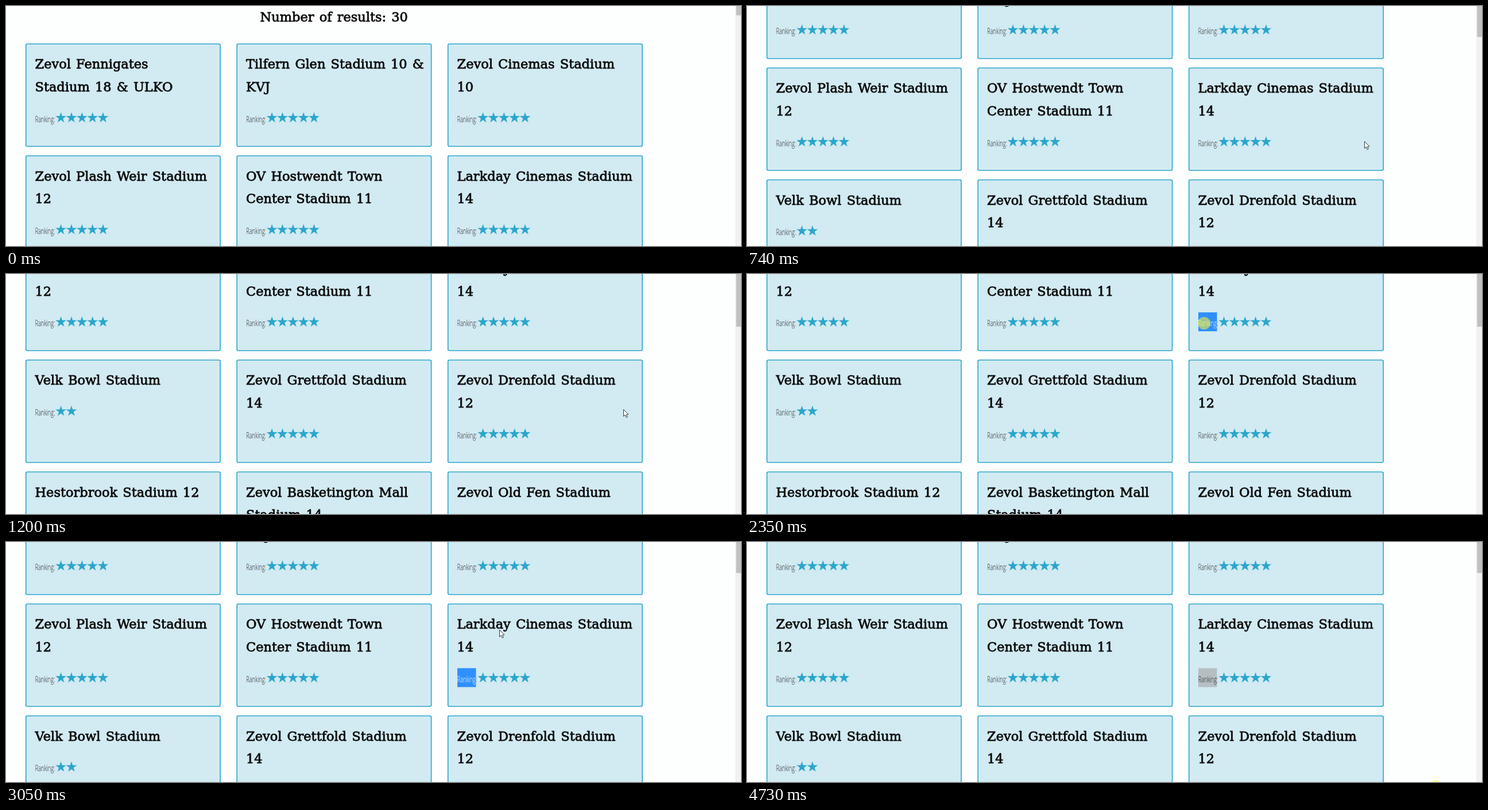
These frames come from a looping animation (1280x419 px, 4800 ms). An HTML page with a canvas:

```html
<!DOCTYPE html>
<html lang="en">
<head>
<meta charset="utf-8">
<title>Search results</title>
<style>
  html, body { margin: 0; width: 100%; height: 100%; overflow: hidden; background: #fdfefe; }
  canvas { display: block; width: 1280px; height: 419px; }
</style>
</head>
<body>
<canvas id="stage" width="1280" height="419"></canvas>
<script>
const ctx = document.getElementById('stage').getContext('2d');
const LOOP = 4800;
const BLUE = '#2ba6cb', INK = '#0a0a0a';
const HEAD_FONT = '22.5px "DejaVu Serif", serif';
const LABEL_FONT = '300 14px "Open Sans", sans-serif';
const NARROW = 0.65; // condensed label face
const COL = 367.5, ROW = 195.3, TOP = 65.4, LINE = 39.6;

// Title lines, then the number of stars
const cards = [
  ['Zevol Fennigates', 'Stadium 18 & ULKO', 5],
  ['Tilfern Glen Stadium 10 &', 'KVJ', 5],
  ['Zevol Cinemas Stadium', '10', 5],
  ['Zevol Plash Weir Stadium', '12', 5],
  ['OV Hostwendt Town', 'Center Stadium 11', 5],
  ['Larkday Cinemas Stadium', '14', 5],
  ['Velk Bowl Stadium', 2],
  ['Zevol Grettfold Stadium', '14', 5],
  ['Zevol Drenfold Stadium', '12', 5],
  ['Hestorbrook Stadium 12', 5],
  ['Zevol Basketington Mall', 'Stadium 14', 5],
  ['Zevol Old Fen Stadium', 5]
];
const SELECTED = 5;

// [time, scroll offset]
const scrolls = [
  [0, 0], [590, 12], [660, 100], [740, 153.3],
  [1050, 165], [1120, 253], [1200, 306.6],
  [2900, 295], [2970, 206], [3050, 153.3]
];

// Pointer moves, shown in n discrete steps from start to end
const moves = [
  { start: 70, end: 200, n: 3, lead: 0, a: [1153, 334], b: [1076, 239] },
  { start: 350, end: 351, n: 1, lead: 1, a: [1076, 239], b: [1075, 236] },
  { start: 1510, end: 1990, n: 7, lead: 1, a: [1075, 236], b: [799, 87], smooth: true },
  { start: 2060, end: 2061, n: 1, lead: 1, a: [799, 87], b: [798, 87] },
  { start: 2445, end: 2760, n: 5, lead: 1, a: [798, 87], b: [859, 153] },
  { start: 3360, end: 3830, n: 7, lead: 1, a: [859, 153], b: [1008, 408], smooth: true },
  { start: 3920, end: 4330, n: 6, lead: 1, a: [1008, 408], b: [1212, 406], bend: -38 }
];

const lastBefore = (list, t, time) => list.filter(e => time(e) <= t).pop();
const within = (t, a, b) => t >= a && t < b;

function pointerAt(t) {
  const m = lastBefore(moves, t, e => e.start);
  if (!m) return null;
  const gap = (m.end - m.start) / Math.max(1, m.n - 1);
  const step = Math.min(m.n - 1, Math.floor((t - m.start) / gap + 0.001));
  let p = (step + m.lead) / (m.n - 1 + m.lead);
  const lift = (m.bend || 0) * Math.sin(Math.PI * p);
  if (m.smooth) p = p * p * (3 - 2 * p);
  return [m.a[0] + (m.b[0] - m.a[0]) * p, m.a[1] + (m.b[1] - m.a[1]) * p + lift];
}

function heading(text, x, y) {
  ctx.font = HEAD_FONT;
  ctx.wordSpacing = '2px';
  ctx.fillStyle = ctx.strokeStyle = INK;
  ctx.lineWidth = 0.8;
  ctx.lineJoin = 'round';
  ctx.fillText(text, x, y);
  ctx.strokeText(text, x, y);
}

function label(x, y, color) {
  ctx.save();
  ctx.translate(x, y);
  ctx.scale(NARROW, 1);
  ctx.font = LABEL_FONT;
  ctx.wordSpacing = '0px';
  ctx.fillStyle = color;
  ctx.fillText('Ranking', 0, 0);
  ctx.fillStyle = '#222';
  ctx.fillText(':', ctx.measureText('Ranking').width, 0);
  ctx.restore();
}

function star(x, y, r) {
  ctx.beginPath();
  for (let i = 0; i < 10; i++) {
    const a = -Math.PI / 2 + i * Math.PI / 5;
    const d = i % 2 ? r * 0.39 : r;
    ctx.lineTo(x + d * Math.cos(a), y + d * Math.sin(a));
  }
  ctx.fillStyle = BLUE;
  ctx.fill();
}

function card(data, i, scroll, t) {
  const x = 34 + (i % 3) * COL;
  const y = TOP + Math.floor(i / 3) * ROW - scroll;
  if (y > 419 || y < -190) return;

  ctx.beginPath();
  ctx.roundRect(x + 0.7, y + 0.8, 338.4, 178.8, 2.5);
  ctx.fillStyle = '#d2eaf2';
  ctx.fill();
  ctx.strokeStyle = BLUE;
  ctx.lineWidth = 1.6;
  ctx.stroke();

  const lines = data.slice(0, -1);
  lines.forEach((s, n) => heading(s, x + 16.5, y + 44 + n * LINE));

  const base = y + 89.9 + (lines.length - 1) * LINE;
  let color = '#222';
  if (i === SELECTED && t >= 2290) {
    const active = t < 4730;
    ctx.fillStyle = active ? '#2f8fff' : '#b5bfc3';
    ctx.fillRect(x + 17, base - 16.6, 32.5, 33);
    if (active) color = '#fff';
  }
  label(x + 16.8, base + 7.6, color);
  for (let n = 0; n < data[data.length - 1]; n++) star(x + 61.6 + n * 18.35, base + 0.3, 9.8);
}

function halo(x, y) {
  ctx.beginPath();
  ctx.arc(x, y, 11, 0, 2 * Math.PI);
  ctx.fillStyle = 'rgba(255, 245, 40, 0.55)';
  ctx.fill();
}

function arrow([x, y]) {
  const shape = [[0, 0], [0, 12], [2.8, 9.5], [4.8, 14], [6.8, 13.1], [4.9, 8.8], [8.4, 8.6]];
  ctx.beginPath();
  shape.forEach(([dx, dy]) => ctx.lineTo(x + 0.5 + dx, y + 0.5 + dy));
  ctx.closePath();
  ctx.fillStyle = '#fff';
  ctx.fill();
  ctx.strokeStyle = '#222';
  ctx.lineWidth = 0.9;
  ctx.stroke();
}

function beam([x, y]) {
  ctx.fillStyle = '#222';
  ctx.fillRect(x - 0.5, y - 6, 1, 12);
  ctx.fillRect(x - 2.5, y - 6, 5, 1);
  ctx.fillRect(x - 2.5, y + 5, 5, 1);
}

function draw(t) {
  const scroll = lastBefore(scrolls, t, e => e[0])[1];
  ctx.fillStyle = '#fdfefe';
  ctx.fillRect(0, 0, 1280, 419);

  heading('Number of results: 30', 442.5, 26.7 - scroll);
  cards.forEach((c, i) => card(c, i, scroll, t));

  ctx.fillStyle = '#f1f1f1';
  ctx.fillRect(1270, 0, 10, 419);
  ctx.fillStyle = '#c1c1c1';
  ctx.fillRect(1271.5, 0, 8.5, 16.3 + scroll * 0.247);

  if (within(t, 2220, 2445)) halo(796, 86);
  if (t >= 4730) halo(1199.5, 427);

  const p = pointerAt(t);
  if (!p || t >= 4500 || within(t, 2220, 2445)) return;
  if (within(t, 1990, 2220)) beam(p);
  else arrow(p);
}

function tick() {
  draw(performance.now() % LOOP);
  requestAnimationFrame(tick);
}
tick();
</script>
</body>
</html>
```
